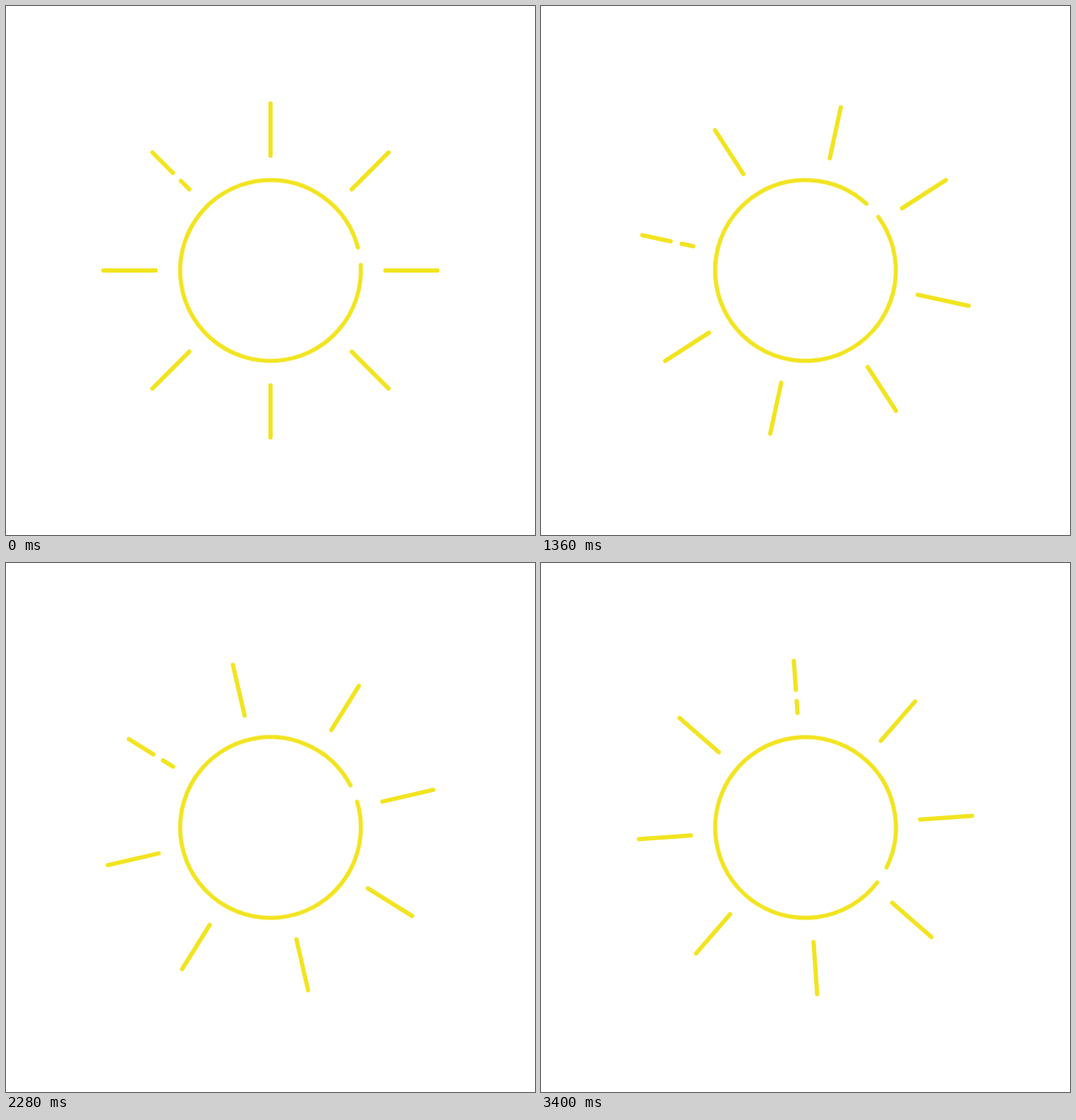
These frames come from a looping animation (748x748 px, 3440 ms). An HTML page:

```html
<!DOCTYPE html>
<html lang="en">
<head>
<meta charset="utf-8">
<title>Sun</title>
<style>
  html, body {
    margin: 0;
    width: 100%;
    height: 100%;
    overflow: hidden;
    background: #fff;
  }
  svg {
    display: block;
    width: 100%;
    height: 100%;
  }
  .sun {
    fill: none;
    stroke: #f2e41f;
    stroke-width: 5.8;
    stroke-linecap: round;
    transform-origin: 0 0;
    animation: sway 3440ms steps(43) -1ms infinite;
  }
  /* 40 ms steps: a slow turn left, then twice as fast to the right */
  @keyframes sway {
    0% { transform: rotate(0deg); }
    49.999% { transform: rotate(-41.482deg); }
    50% { transform: rotate(-40.035deg); }
    100% { transform: rotate(42.929deg); }
  }
</style>
</head>
<body>
<svg viewBox="-374 -374 748 748">
  <defs>
    <path id="ray" d="M162.3 0H236.2"/>
  </defs>
  <g class="sun">
    <circle r="127.8" pathLength="360" stroke-dasharray="348.75 11.25" transform="rotate(-3.5)"/>
    <use href="#ray"/>
    <use href="#ray" transform="rotate(45)"/>
    <use href="#ray" transform="rotate(90)"/>
    <use href="#ray" transform="rotate(135)"/>
    <use href="#ray" transform="rotate(180)"/>
    <path d="M162.3 0H179.3M195 0H236.2" transform="rotate(225)"/>
    <use href="#ray" transform="rotate(270)"/>
    <use href="#ray" transform="rotate(315)"/>
  </g>
</svg>
</body>
</html>
```
